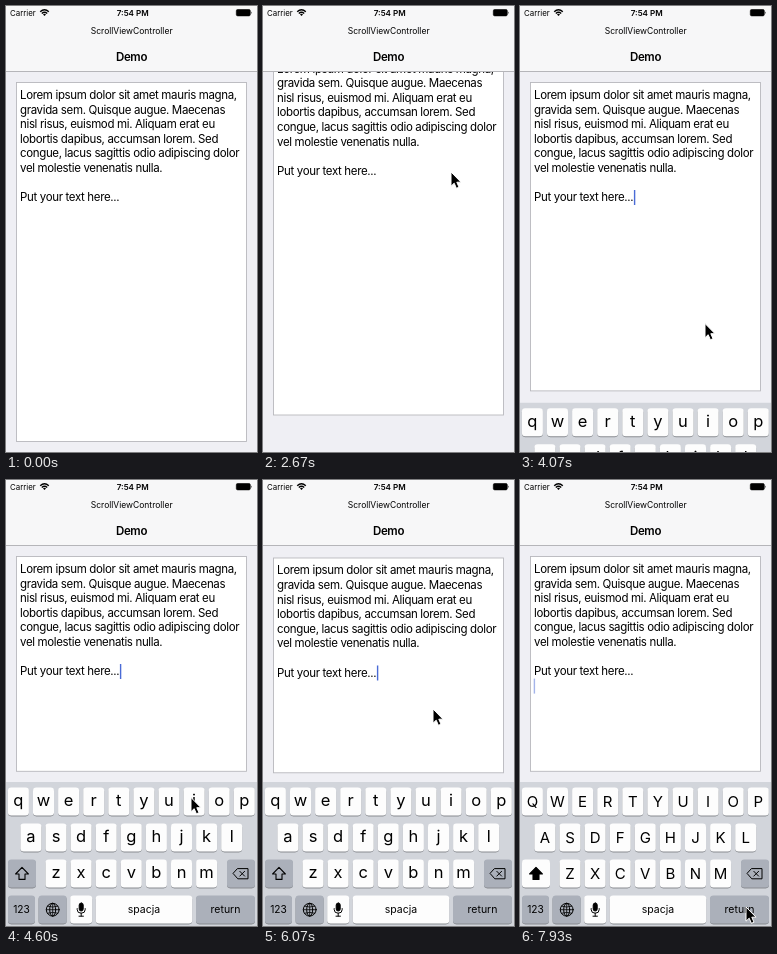
Animation of 251 by 446 pixels, one loop 8 s. Source, as an HTML page:

```html
<!DOCTYPE html>
<html lang="en">
<head>
<meta charset="utf-8">
<title>Scroll view demo</title>
<style>
html, body { margin: 0; width: 100%; height: 100%; overflow: hidden; background: #efeff4; }
svg { display: block; width: 100vw; height: 100vh; }
text { font-family: Inter, "Liberation Sans", sans-serif; fill: #000; white-space: pre; }
.mid { text-anchor: middle; }
.body { font-size: 11.5px; letter-spacing: -.35px; }
.line { fill: none; stroke: #000; stroke-linecap: round; stroke-linejoin: round; }
</style>
</head>
<body>
<svg id="stage" viewBox="0 0 251 446">
  <rect width="251" height="446" fill="#efeff4"/>
  <g id="content">
    <rect id="box" x="10.5" y="76.5" width="230" height="359" fill="#fff" stroke="#b8b8bd" stroke-width=".9"/>
    <g id="lines" class="body"></g>
    <rect id="caret" width="1.4" height="15" fill="#4a6bd6"/>
  </g>

  <rect width="251" height="65" fill="#f7f7f8"/>
  <rect y="65" width="251" height="1" fill="#b5b5b9"/>
  <text x="4" y="9.7" font-size="7.9">Carrier</text>
  <g class="line" stroke-width="1.4" style="stroke-linecap:butt">
    <path d="M34.2 5.7Q38.5 1.7 42.8 5.7M35.8 7.4Q38.5 4.9 41.2 7.4"/>
    <path d="M37 8.4Q38.5 7.2 40 8.4L38.5 10Z" fill="#000" stroke="none"/>
  </g>
  <text class="mid" x="126.7" y="9.7" font-size="8.1" font-weight="600">7:54 PM</text>
  <rect x="230.3" y="3.5" width="14" height="6.4" rx="1.4" fill="#000" stroke="#000" stroke-width=".6"/>
  <path d="M245.3 5.4q1.3 1.3 0 2.7z"/>
  <text class="mid" x="125.7" y="28" font-size="8.5">ScrollViewController</text>
  <text class="mid" x="125.5" y="55" font-size="11.5" font-weight="600" letter-spacing="-.35">Demo</text>

  <g id="keyboard">
    <rect y="302" width="251" height="146" fill="#d2d5db"/>
    <g id="keys"></g>
    <path id="shift" class="line" stroke-width="1.1" d="M16 387.3L22.4 394H19V399.4H13V394H9.6Z"/>
    <g class="line" stroke-width="1">
      <path d="M231.8 388.6H242V398.8H231.8L227.3 393.7Z"/>
      <path d="M233.8 391.3L238.6 396.1M238.6 391.3L233.8 396.1"/>
      <circle cx="46.7" cy="429.7" r="6.4"/>
      <ellipse cx="46.7" cy="429.7" rx="3" ry="6.4"/>
      <path d="M40.3 429.7H53.1M46.7 423.3V436.1M41.6 426.2Q46.7 428 51.8 426.2M41.6 433.2Q46.7 431.4 51.8 433.2" stroke-width=".8"/>
      <rect x="73.2" y="423" width="4" height="8" rx="2" fill="#000"/>
      <path d="M71.2 428.6V429.6Q71.2 433.2 75.2 433.2T79.2 429.6V428.6M75.2 433.2V436M73 436.2H77.4"/>
    </g>
  </g>

  <path id="cursor" d="M0 0V14.2L3.2 11.2L5.4 16.3L8 15.2L5.8 10.2H10Z" fill="#000" stroke="#fff" stroke-width="1"/>
</svg>
<script>
const LOOP = 8000, LINE = 14.6, BASE = 93;
const KEYS_IN = 4020, KEYS_UP = 4400, NEWLINE = 7700;
const $ = id => document.getElementById(id);

function add(parent, tag, attrs, text) {
  const el = document.createElementNS("http://www.w3.org/2000/svg", tag);
  for (const name in attrs) el.setAttribute(name, attrs[name]);
  if (text) el.textContent = text;
  parent.appendChild(el);
  return el;
}

const copy = [
  "Lorem ipsum dolor sit amet mauris magna,",
  "gravida sem. Quisque augue. Maecenas",
  "nisl risus, euismod mi. Aliquam erat eu",
  "lobortis dapibus, accumsan lorem. Sed",
  "congue, lacus sagittis odio adipiscing dolor",
  "vel molestie venenatis nulla.",
  "",
  "Put your text here..."
];
copy.forEach((line, i) => add($("lines"), "text", { x: 14, y: BASE + i * LINE }, line));

const WHITE = "#fdfdfd", GRAY = "#abb0ba";
function key(x, y, width, fill, label, size) {
  const box = { x, width, height: 28, rx: 3.3 };
  add($("keys"), "rect", { ...box, y: y + .9, fill: "#888b90" });
  const face = add($("keys"), "rect", { ...box, y, fill });
  if (label) add($("keys"), "text", { class: "mid", x: x + width / 2, y: y + 14 + size * .34, "font-size": size }, label);
  return face;
}

const letters = [];
["qwertyuiop", "asdfghjkl", "zxcvbnm"].forEach((row, r) => {
  const left = [1.9, 14.4, 39.5][r];
  [...row].forEach((ch, i) => {
    key(left + i * 25.1, 307.5 + r * 36, 21, WHITE, ch, 16.5);
    letters.push({ el: $("keys").lastChild, ch, y: 321.5 + r * 36 });
  });
});
const shiftKey = key(2, 379.5, 28, GRAY);
key(221, 379.5, 28, GRAY);
key(2, 415.5, 27, GRAY, "123", 10.2);
key(32.5, 415.5, 28.2, GRAY);
key(64.2, 415.5, 22, WHITE);
key(89.8, 415.5, 96.4, WHITE, "spacja", 10.5);
key(190, 415.5, 59, GRAY, "return", 10.5);

const clamp = v => Math.max(0, Math.min(1, v));
const smooth = v => v * v * (3 - 2 * v);
const ramp = (t, from, to) => clamp((t - from) / (to - from));

// time, x, y of the pointer tip
const path = [
  [1930, 240, 262], [2200, 192, 219], [2670, 188, 166], [2740, 188, 165],
  [3070, 174, 306.5], [3330, 174, 306.5], [3850, 185, 317.5], [4600, 185, 317.5],
  [4990, 165, 182], [5530, 155, 298.5], [5600, 155, 302], [5640, 155, 302],
  [6070, 170, 229], [6580, 178, 222], [6800, 178, 222], [7600, 226, 427]
];
function pointer(t) {
  const n = path.findIndex(p => p[0] > t);
  if (n < 0) return path[path.length - 1].slice(1);
  if (n === 0) return path[0].slice(1);
  const a = path[n - 1], b = path[n], k = smooth(ramp(t, a[0], b[0]));
  return [a[1] + (b[1] - a[1]) * k, a[2] + (b[2] - a[2]) * k];
}

// Rubber band: half speed while dragging, exponential return after release.
const drags = [
  { from: 2200, to: 3111, y: 219 },
  { from: 5000, to: 5620, y: 182 }
];
function scroll(t) {
  const d = drags.filter(d => t >= d.from).pop();
  if (!d) return 0;
  const pull = (pointer(Math.min(t, d.to))[1] - d.y) / 2;
  const offset = t <= d.to ? pull : pull * Math.exp((d.to - t) / 122);
  return t > d.to && Math.abs(offset) < .25 ? 0 : offset;
}

function caretAlpha(t) {
  if (t < KEYS_IN) return 0;
  if (t >= NEWLINE) return 1 - .5 * ramp(t, NEWLINE, 7900);
  const p = t % 1000;
  return 1 - ramp(p, 110, 210) + ramp(p, 400, 500);
}

let caps = null;
function setCaps(on) {
  if (on === caps) return;
  caps = on;
  const size = on ? 15 : 16.5;
  for (const { el, ch, y } of letters) {
    el.textContent = on ? ch.toUpperCase() : ch;
    el.setAttribute("font-size", size);
    el.setAttribute("y", y + (on ? 5.4 : 4.6));
  }
  shiftKey.setAttribute("fill", on ? WHITE : GRAY);
  $("shift").setAttribute("fill", on ? "#000" : "none");
  $("shift").style.fill = on ? "#000" : "none";
}

function draw(t) {
  const up = 1 - Math.pow(1 - ramp(t, KEYS_IN, KEYS_UP), 3);
  $("content").setAttribute("transform", `translate(0 ${scroll(t).toFixed(2)})`);
  $("box").setAttribute("height", 359 - 144.2 * up);
  $("keyboard").setAttribute("transform", `translate(0 ${146 * (1 - up)})`);

  const typed = t >= NEWLINE;
  $("caret").setAttribute("x", typed ? 13.7 : 113.9);
  $("caret").setAttribute("y", typed ? 198.6 : 184);
  $("caret").setAttribute("opacity", caretAlpha(t));
  setCaps(typed);

  const [x, y] = pointer(t);
  $("cursor").setAttribute("transform", `translate(${x} ${y})`);
  $("cursor").setAttribute("visibility", t < path[0][0] ? "hidden" : "visible");
}

const start = performance.now();
function tick() {
  draw((performance.now() - start) % LOOP);
  requestAnimationFrame(tick);
}
tick();
</script>
</body>
</html>
```
